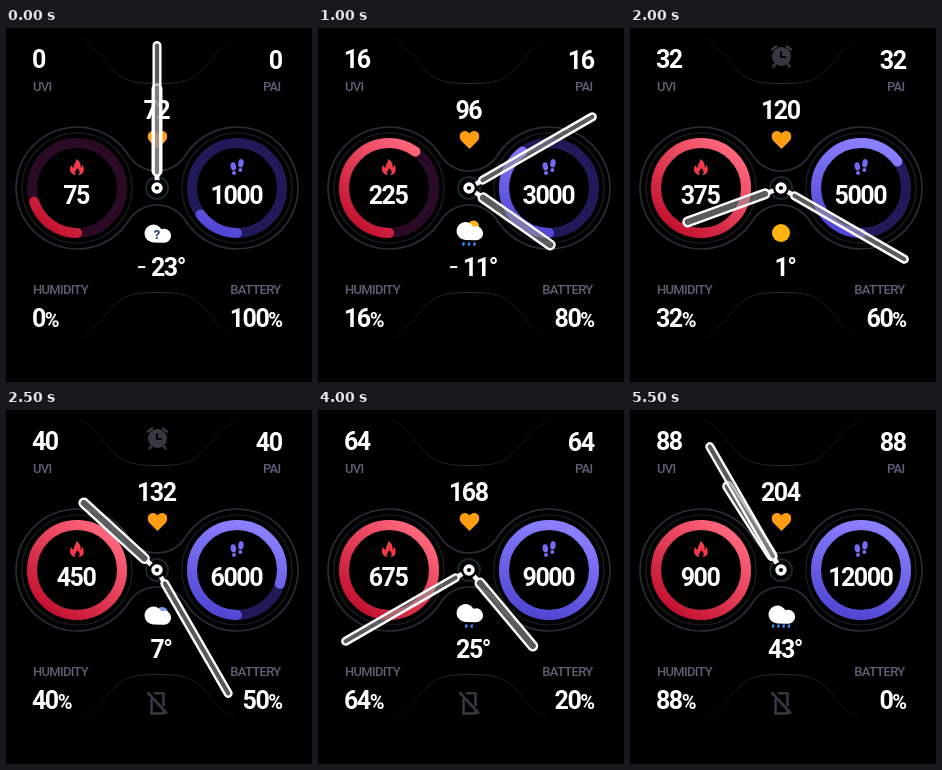
Write an HTML page that moves like this. It is 306 px wide and 354 px high and loops after 6000 ms.

```html
<!DOCTYPE html>
<html lang="en">
<head>
<meta charset="utf-8">
<title>Watch face</title>
<style>
  html, body { margin: 0; width: 100%; height: 100%; overflow: hidden; background: #000; }
  svg { display: block; width: 306px; height: 354px; }
  text { font-family: Roboto, "Noto Sans", sans-serif; }
  .num { font-size: 25px; font-weight: 600; letter-spacing: -1.5px; fill: #fff; }
  .unit { font-size: 20px; }
  .minus { font-size: 17px; font-weight: 700; }
  .label { font-size: 13px; font-weight: 500; letter-spacing: -.7px; fill: #5d5f76; }
  .mid { text-anchor: middle; }
  .end { text-anchor: end; }
  .line { fill: none; stroke: #2b2e35; stroke-width: 1.6; }
  .thin { fill: none; stroke: #1d2026; stroke-width: 1.2; }
  .ring { fill: none; stroke-width: 10; stroke-linecap: round; }
  .hand { fill: rgba(150, 150, 150, .6); stroke: #fff; stroke-width: 2.4; }
  .neck { stroke: #fff; stroke-width: 4.5; }
  .status { fill: none; stroke: #363941; stroke-width: 2.6; }
</style>
</head>
<body>
<svg viewBox="0 0 306 354">
  <defs>
    <linearGradient id="red" gradientUnits="userSpaceOnUse" x1="42" y1="200" x2="102" y2="124">
      <stop offset="0" stop-color="#c3122f"/><stop offset="1" stop-color="#ff667c"/>
    </linearGradient>
    <linearGradient id="violet" gradientUnits="userSpaceOnUse" x1="216" y1="206" x2="242" y2="116">
      <stop offset="0" stop-color="#5146d2"/><stop offset="1" stop-color="#8a80ff"/>
    </linearGradient>
    <linearGradient id="fade" gradientUnits="userSpaceOnUse" x1="75" y1="0" x2="229" y2="0">
      <stop offset="0" stop-color="#0c0d0f"/><stop offset=".5" stop-color="#2a2d32"/><stop offset="1" stop-color="#0c0d0f"/>
    </linearGradient>
    <path id="cloud" fill="#fff" d="M147.500 213.500a9 9 0 1 1 8-13.200a7 7 0 1 1 1.500 13.400z"/>
    <path id="wave" fill="none" stroke="url(#fade)" d="M75 10C93 20 99 36 112 46C122 54 132 55.500 152 55.500S182 54 192 46C205 36 211 20 229 10"/>
  </defs>

  <use href="#wave"/>
  <use href="#wave" transform="matrix(1 0 0 -1 0 320)"/>

  <path class="line" d="M122.500 127.300A61 61 0 1 0 122.500 192.700A33.700 33.700 0 0 1 179.500 192.700A61 61 0 1 0 179.500 127.300A33.700 33.700 0 0 1 122.500 127.300z"/>
  <circle class="thin" cx="71" cy="160" r="55"/>
  <circle class="thin" cx="231" cy="160" r="55"/>
  <circle class="thin" cx="151" cy="160" r="11" style="stroke:#1c272b;stroke-width:2"/>

  <circle class="ring" cx="71" cy="160" r="45" stroke="#2b0a26"/>
  <circle class="ring" cx="231" cy="160" r="45" stroke="#201b58"/>
  <path class="ring" id="burn" pathLength="360" stroke="url(#red)" d="M71 205A45 45 0 0 1 71 115A45 45 0 0 1 71 205"/>
  <path class="ring" id="walk" pathLength="360" stroke="url(#violet)" d="M231 205A45 45 0 0 1 231 115A45 45 0 0 1 231 205"/>

  <path fill="#f23a49" d="M70 131C75 134 75 137 74.500 139.500C76 139 76.300 137.500 76.300 136.500C79 141 78 147 72.500 147C75 144 73 142 71 140C71 143 67.500 143.500 69.500 147C63 146 63 140 65.500 137C66 139 67 139.500 68 139.500C67.500 136 70.500 134.500 70 131z"/>
  <g fill="#766bf4">
    <ellipse cx="227.300" cy="138.500" rx="2.700" ry="4.200" transform="rotate(-8 227 138)"/>
    <ellipse cx="228" cy="145" rx="2" ry="1.900"/>
    <ellipse cx="235" cy="135.300" rx="2.700" ry="4.200" transform="rotate(8 235 135)"/>
    <ellipse cx="234.300" cy="142" rx="2" ry="1.900"/>
  </g>
  <path fill="#ff9d12" d="M151.500 121L143.500 113C140 109 142 103 147 103C149 103 150.500 104 151.500 105.500C152.500 104 154 103 156 103C161 103 163 109 159.500 113z"/>

  <g id="alarm">
    <circle cx="151.500" cy="28.500" r="9.500" fill="#363941"/>
    <path class="status" stroke-linecap="round" d="M142 21.500l4-3M161 21.500l-4-3M145 36.500l-1.500 2M158 36.500l1.500 2"/>
    <path fill="none" stroke="#000" stroke-width="2" d="M151 23.500v5.500h5"/>
  </g>
  <g id="phone" class="status">
    <path d="M145.500 289v14.500h12v-4M148 283.200h9.500v13"/>
    <path d="M141.500 282.500l19.500 21"/>
  </g>

  <text class="label" x="27" y="63">UVI</text>
  <text class="label end" x="274.500" y="63">PAI</text>
  <text class="label" x="27" y="266">HUMIDITY</text>
  <text class="label end" x="274.500" y="266">BATTERY</text>

  <text class="num" id="uvi" x="26" y="40"></text>
  <text class="num end" id="pai" x="275.500" y="41"></text>
  <text class="num mid" id="pulse" x="150.300" y="91"></text>
  <text class="num mid" id="kcal" x="70" y="176"></text>
  <text class="num mid" id="steps" x="230.300" y="176"></text>
  <text class="num mid" id="temp" x="155" y="248"></text>
  <text class="num" id="humid" x="26" y="299"></text>
  <text class="num end" id="power" x="275.500" y="299"></text>

  <g id="sky"></g>

  <g id="hour">
    <path class="neck" d="M151 155v-8"/>
    <rect class="hand" x="146.700" y="56.500" width="8.600" height="90.700" rx="4.300"/>
  </g>
  <g id="minute">
    <path class="neck" d="M151 155v-8"/>
    <rect class="hand" x="147.700" y="14.200" width="6.600" height="133.500" rx="3.300"/>
  </g>
  <circle cx="151" cy="160" r="8" fill="#000"/>
  <circle cx="151" cy="160" r="3.900" fill="#000" stroke="#fff" stroke-width="3.600"/>
</svg>

<script>
const STEP = 500, COUNT = 12, LEVELS = 20;
const $ = id => document.getElementById(id);

const dot = (x, y, r, fill) => `<circle cx="${x}" cy="${y}" r="${r}" fill="${fill}"/>`;
const row = (n, gap, draw) =>
  Array.from({ length: n }, (_, i) => draw(151 + (i - (n - 1) / 2) * gap)).join('');
const rain = (n, gap = 5.5) => row(n, gap, x =>
  `<path d="M${x + .2} 215.500l-.4 1.200" stroke="#3f86f5" stroke-width="2.400" stroke-linecap="round"/>`);
const snow = (n, gap = 6.5) => row(n, gap, x => dot(x, 216, 1.6, '#fff'));
const flake = '<path d="M151 212.500v6.500M148.200 214.200l5.600 3.200M148.200 217.400l5.600-3.200" stroke="#fff" stroke-width="1.300"/>';

const cloud = '<use href="#cloud"/>';
const high = '<use href="#cloud" y="-1.500"/>';
const sun = dot(155.5, 198, 5.5, '#ffb40f');
const shade = dot(156, 203.5, 6.5, '#7d9bf0');
const mark = '<text class="mid" x="151" y="211" font-size="13" font-weight="700" fill="#24386e">?</text>';

const skies = [
  '<use href="#cloud" y="1"/>' + mark,
  sun + cloud,
  sun + high + rain(3),
  sun + high + snow(1),
  dot(151, 205, 9, '#ffb40f'),
  shade + '<use href="#cloud" y="1"/>',
  high + rain(1),
  high + flake,
  high + rain(2),
  high + snow(2),
  high + snow(3),
  cloud + rain(4, 5.3)
];

const setText = (id, value) => { $(id).innerHTML = value; };
const percent = n => `${n}<tspan class="unit">%</tspan>`;
const degrees = n => n < 0
  ? `<tspan class="minus" dy="-3">−</tspan><tspan dx="6" dy="3">${-n}°</tspan>`
  : n + '°';
// gauges move in whole levels
const setArc = (id, part) => {
  const level = Math.round(LEVELS * Math.min(1, part));
  $(id).setAttribute('stroke-dasharray', `${360 * level / LEVELS} 720`);
};
const turn = (id, deg) => $(id).setAttribute('transform', `rotate(${deg} 151 160)`);
const show = (id, on) => { $(id).style.display = on ? '' : 'none'; };

function render(k) {
  const kcal = 75 * (k + 1), steps = 1000 * (k + 1);
  setText('uvi', 8 * k);
  setText('pai', 8 * k);
  setText('humid', percent(8 * k));
  setText('power', percent(Math.max(0, 100 - 10 * k)));
  setText('pulse', 72 + 12 * k);
  setText('kcal', kcal);
  setText('steps', steps);
  setText('temp', degrees(6 * k - 23));
  setArc('burn', kcal / 375);
  setArc('walk', steps / 7500);
  // each step advances the clock by 2 h 5 min
  turn('hour', 62.5 * k);
  turn('minute', 30 * k);
  show('alarm', k >= 4 && k < 8);
  show('phone', k >= 5);
  $('sky').innerHTML = skies[k];
}

const start = performance.now();
let last = -1;
function tick() {
  const k = Math.floor((performance.now() - start) / STEP) % COUNT;
  if (k !== last) render(last = k);
  requestAnimationFrame(tick);
}
tick();
</script>
</body>
</html>
```
